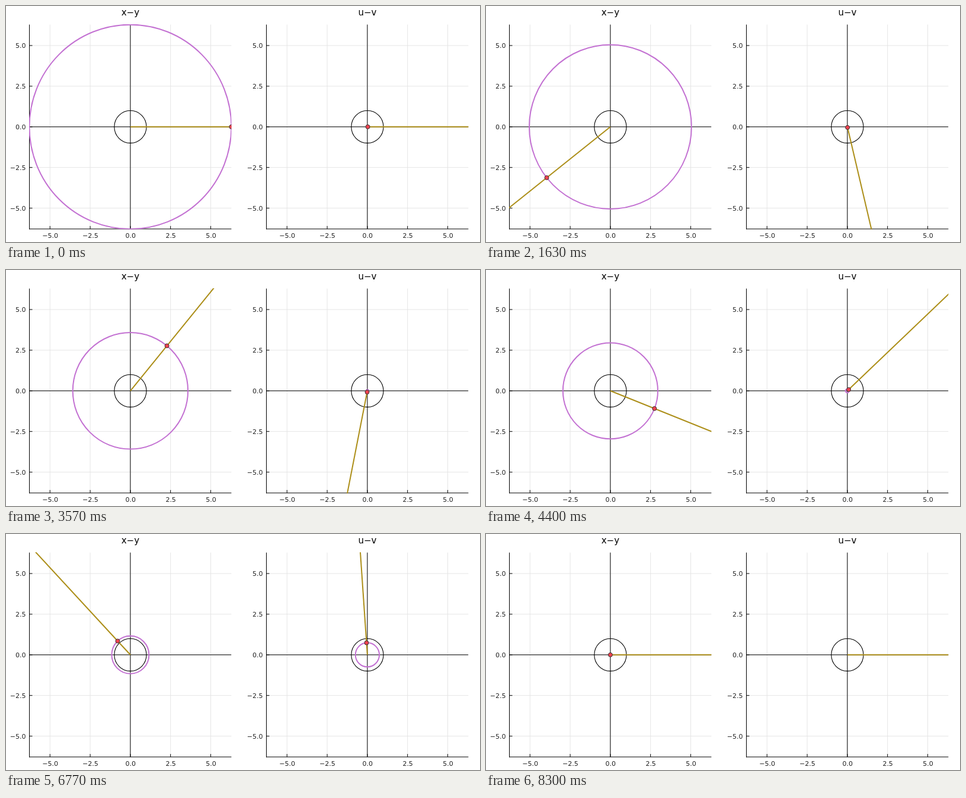
Write an HTML page with a canvas that moves like this. It is 800x400 px and loops after 8330 ms.

```html
<!DOCTYPE html>
<html lang="en">
<head>
<meta charset="utf-8">
<title>Inverse square map</title>
<style>
  html, body { margin: 0; width: 100%; height: 100%; overflow: hidden; background: #fff; }
  canvas { display: block; width: 800px; height: 400px; }
</style>
</head>
<body>
<canvas id="stage" width="800" height="400"></canvas>
<script>
const ctx = document.getElementById('stage').getContext('2d');
const LOOP = 8330, LAST = 249, TAU = 2 * Math.PI;
const UX = 27.13, UY = 27.56;   // pixels per unit
const CX = 209.9, CY = 204.8;   // origin of a panel
const LEFT = 39.5, RIGHT = 380.4, TOP = 31.5, BOTTOM = 377.9;
const TICKS = [-5, -2.5, 0, 2.5, 5];
const FONT = '"DejaVu Sans", Verdana, sans-serif';

const px = x => CX + x * UX;
const py = y => CY - y * UY;

function line(x1, y1, x2, y2, color = '#000', width = 1) {
  ctx.beginPath();
  ctx.moveTo(x1, y1);
  ctx.lineTo(x2, y2);
  ctx.strokeStyle = color;
  ctx.lineWidth = width;
  ctx.stroke();
}

function circle(r, color, width) {
  ctx.beginPath();
  ctx.ellipse(CX, CY, r * UX, r * UY, 0, 0, TAU);
  ctx.strokeStyle = color;
  ctx.lineWidth = width;
  ctx.stroke();
}

function text(str, x, y, size, align, color) {
  ctx.font = `${size}px ${FONT}`;
  ctx.textAlign = align;
  ctx.fillStyle = color;
  ctx.fillText(str, x, y);
}

function axes(title) {
  for (const v of TICKS) {
    line(px(v), TOP, px(v), BOTTOM, '#e5e5e5');
    line(LEFT, py(v), RIGHT, py(v), '#e5e5e5');
  }
  line(LEFT, TOP, LEFT, BOTTOM + 0.5);
  line(LEFT - 0.5, BOTTOM, RIGHT, BOTTOM);
  for (const v of TICKS) {
    const label = v.toFixed(1).replace('-', '\u2212');
    line(px(v), BOTTOM, px(v), BOTTOM - 5);
    line(LEFT, py(v), LEFT + 5, py(v));
    text(label, px(v) + 0.4, 393, 11, 'center', '#222');
    text(label, 33.5, py(v) + 4.2, 11, 'right', '#222');
  }
  text(title, CX, 16, 15, 'center', '#000');
}

function panel(offset, title, r, angle) {
  ctx.save();
  ctx.translate(offset, 0);
  axes(title);
  ctx.beginPath();
  ctx.rect(LEFT - 0.5, TOP - 0.5, RIGHT - LEFT + 0.5, BOTTOM - TOP + 1);
  ctx.clip();

  line(LEFT, CY, RIGHT, CY);
  line(CX, TOP, CX, BOTTOM);
  circle(1, '#000', 1.1);

  const c = Math.cos(angle), s = Math.sin(angle);
  const visible = r < 20;
  if (visible) circle(r, '#c371d2', 2);
  line(CX, CY, px(20 * c), py(20 * s), '#ac8e18', 2);
  if (visible) {
    ctx.beginPath();
    ctx.arc(px(r * c), py(r * s), 3.5, 0, TAU);
    ctx.fillStyle = '#f0424f';
    ctx.fill();
    ctx.strokeStyle = '#333';
    ctx.lineWidth = 1;
    ctx.stroke();
  }
  ctx.restore();
}

// z = r e^(2ir) on the left, 1 / z^2 on the right
function draw(step) {
  const r = TAU * (1 - step / LAST);
  ctx.fillStyle = '#fff';
  ctx.fillRect(0, 0, 800, 400);
  panel(0, 'x\u2212y', r, 2 * r);
  panel(400, 'u\u2212v', 1 / (r * r), -4 * r);
}

// 30 steps per second, with times rounded to 10 ms
const stepAt = ms => Math.min(LAST, Math.floor(0.3 * Math.floor(ms / 10) + 0.15));

const start = performance.now();
function tick() {
  draw(stepAt((performance.now() - start) % LOOP));
  requestAnimationFrame(tick);
}
tick();
</script>
</body>
</html>
```
